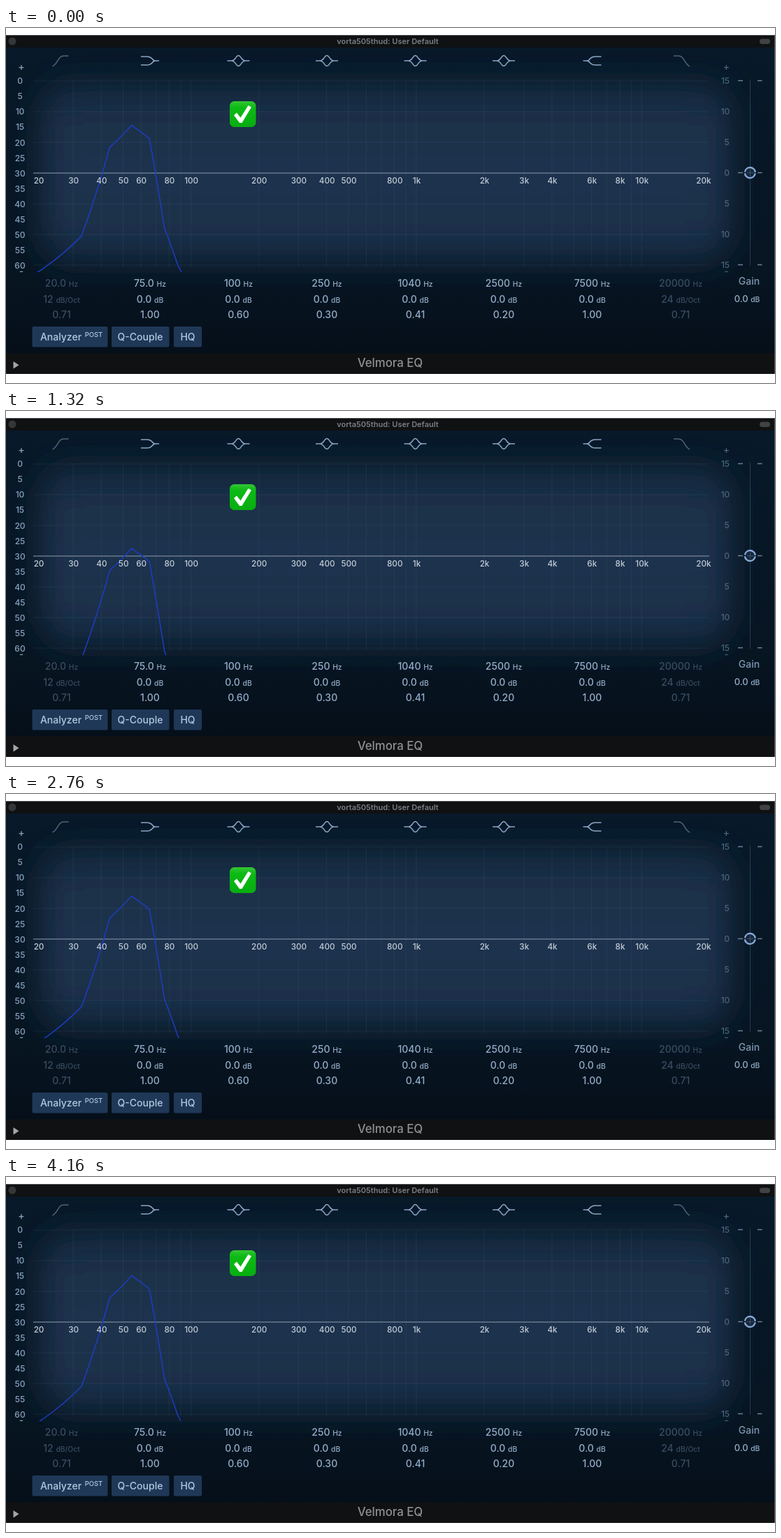
Animation of 1100x509 px, one loop 4200 ms. Source, as an HTML page:

```html
<!DOCTYPE html>
<html lang="en">
<head>
<meta charset="utf-8">
<title>Equalizer</title>
<style>
html, body { margin: 0; width: 100%; height: 100%; overflow: hidden; background: #fff; }
svg { display: block; width: 100%; height: 100%; }
text { font-family: Inter, Roboto, sans-serif; font-weight: 500; }
.mid { text-anchor: middle; }
.grid { stroke: #7295b8; stroke-opacity: .11; fill: none; }
.icon { fill: none; stroke: #8ba5c2; stroke-width: 1.5; stroke-linejoin: round; }
.icon.off { stroke: #526476; }
.curve { fill: none; stroke-width: 1.5; stroke-linejoin: round; }
.tick { stroke: #6b8098; stroke-width: 1.3; }
.button { fill: #1f3857; }
</style>
</head>
<body>
<svg viewBox="0 0 1100 509" preserveAspectRatio="none">
  <defs>
    <linearGradient id="body" x2="0" y2="1">
      <stop offset="0" stop-color="#081929"/>
      <stop offset=".75" stop-color="#071521"/>
      <stop offset="1" stop-color="#050f1a"/>
    </linearGradient>
    <linearGradient id="panel" x2="0" y2="1">
      <stop offset="0" stop-color="#182c42"/>
      <stop offset=".5" stop-color="#1d344f"/>
      <stop offset="1" stop-color="#182c44"/>
    </linearGradient>
    <linearGradient id="green" x2="0" y2="1">
      <stop offset="0" stop-color="#35c535"/>
      <stop offset=".25" stop-color="#0cba15"/>
      <stop offset="1" stop-color="#08ad10"/>
    </linearGradient>
    <filter id="soft" x="-10%" y="-40%" width="120%" height="180%"><feGaussianBlur stdDeviation="23"/></filter>
    <clipPath id="plot"><rect x="39.5" y="66" width="967" height="284"/></clipPath>
  </defs>

  <rect y="10" width="1100" height="486" fill="#101112"/>
  <circle cx="9" cy="19" r="5.5" fill="#343638"/>
  <rect x="1078" y="15.5" width="15" height="7.5" rx="3.7" fill="#404244"/>
  <text class="mid" x="546" y="22.5" font-size="11" style="font-weight:600" fill="#7b7f84">vorta505thud: User Default</text>

  <rect y="28" width="1100" height="438" fill="url(#body)"/>
  <rect x="50" y="80" width="986" height="256" rx="40" fill="url(#panel)" filter="url(#soft)"/>
  <path d="M0 10.5H1099.5V496" fill="none" stroke="#4b4d50"/>
  <g id="static"></g>

  <g clip-path="url(#plot)">
    <path id="blue" class="curve" stroke="#1d3cc0"/>
    <path id="red" class="curve" stroke="#a92d3f"/>
  </g>
  <g id="labels"></g>

  <rect x="320" y="105" width="37.5" height="37" rx="6.5" fill="url(#green)"/>
  <path d="M326 125L330 121.5L335.5 128.5L346.5 111L351 113.5L337.5 136H334Z" fill="#fff"/>

  <path d="M1064.5 74V341" stroke="#263a50"/>
  <circle cx="1064.3" cy="207.5" r="7.5" fill="#16263b" stroke="#86a8d6" stroke-width="2.4" stroke-dasharray="21.56 2" stroke-dashoffset="-1"/>
  <path d="M1060 207.5H1069M1064.5 203V212" stroke="#3c5270"/>

  <rect class="button" x="37.5" y="428" width="108" height="29.5" rx="2"/>
  <rect class="button" x="151" y="428" width="82.5" height="29.5" rx="2"/>
  <rect class="button" x="240" y="428" width="40" height="29.5" rx="2"/>
  <g class="mid" font-size="14" fill="#b2c8e2">
    <text x="78.5" y="448">Analyzer</text>
    <text x="125.5" y="443" font-size="9.5">POST</text>
    <text x="192" y="448">Q-Couple</text>
    <text x="260" y="448">HQ</text>
  </g>
  <path d="M0 466.5H1099" stroke="#0a1118"/>
  <path d="M10.5 478L18.5 483.2L10.5 488.5Z" fill="#a4a6a8"/>
  <text class="mid" x="549.5" y="486" font-size="16.8" fill="#8e9092">Velmora EQ</text>
</svg>
<script>
const $ = id => document.getElementById(id);
const LOOP = 4200, STEP = 40, BIN = 10.9;
const freqX = f => 39.3 + 322.3 * Math.log10(f / 20);
const label = (x, y, s, size, fill) =>
  `<text class="mid" x="${x}" y="${y}" font-size="${size}" fill="${fill}">${s}</text>`;

// Grid, zero line and slider ticks
let art = '', d = '';
for (let base = 10; base <= 10000; base *= 10)
  for (let n = 1; n < 10; n++) {
    const f = base * n;
    if (f > 20 && f < 20000) d += `M${freqX(f)} 76V343`;
  }
for (let y = 76; y < 345; y += 44) d += `M39 ${y}H1006`;
art += `<path class="grid" d="${d}"/><path d="M39 208H1006" stroke="#8b98a6" stroke-width="1.2"/>`;
for (let y = 75.5; y < 345; y += 132)
  art += `<path class="tick" d="M1047 ${y}H1054M1075 ${y}H1081.5"/>`;

// Bands: filter icons and settings
const bell = x => `M${x - 16} 47H${x - 10}Q${x - 7} 47 ${x - 4} 43Q${x} 36 ${x + 4} 43Q${x + 7} 47 ${x + 10} 47H${x + 16}` +
  `M${x - 10} 47Q${x - 7} 47 ${x - 4} 51Q${x} 58 ${x + 4} 51Q${x + 7} 47 ${x + 10} 47`;
const shelf = (x, s) => [41, 53].map(y =>
  `M${x - 13 * s} ${y}H${x - 4 * s}Q${x} ${y} ${x + 3 * s} ${(y + 47) / 2}Q${x + 5 * s} 47 ${x + 8 * s} 47`).join('') + `H${x + 13 * s}`;
const cut = (x, s) => `M${x - 11 * s} 55C${x - 6 * s} 53 ${x - 4 * s} 46 ${x} 42Q${x + 2 * s} 40 ${x + 5 * s} 40H${x + 12 * s}`;
const value = (x, y, n, unit, fill, size = 14) =>
  label(x, y, unit ? `${n} <tspan font-size="10.3">${unit}</tspan>` : n, size, fill);
const bands = [
  ['20.0', '0.71', '12'], ['75.0', '1.00'], ['100', '0.60'], ['250', '0.30'],
  ['1040', '0.41'], ['2500', '0.20'], ['7500', '1.00'], ['20000', '0.71', '24']
];
bands.forEach(([hz, q, slope], i) => {
  const x = 79.5 + i * 126.5, side = i < 4 ? 1 : -1;
  const fill = slope ? '#3a4c60' : '#94adc9';
  const path = slope ? cut(x - 2 * side, side) : i % 5 === 1 ? shelf(x, side) : bell(x);
  art += `<path class="icon ${slope ? 'off' : ''}" d="${path}"/>`;
  art += value(x, 371, hz, 'Hz', fill) + value(x, 416, q, '', fill) +
    value(x, 393.5, slope || '0.0', slope ? 'dB/Oct' : 'dB', fill);
});
art += value(1063, 368, 'Gain', '', '#7f96b1') + value(1060, 393, '0.0', 'dB', '#94adc9', 13);

// Scales
const scale = '#8aa3bf', dim = '#4d637b';
for (const [x, fill] of [[22, scale], [1030.5, dim]])
  art += label(x, 60.5, '+', 14, fill) + label(x, 353, '-', 13, fill);
for (let n = 0; n <= 60; n += 5) art += label(20, 80.3 + n * 4.41, n, 12, scale);
for (let n = -15; n <= 15; n += 5)
  art += label(Math.abs(n) > 9 ? 1029 : 1031, 212.3 + n * 8.8, Math.abs(n), 12, dim);
$('static').innerHTML = art;

let names = label(47, 223.3, 20, 11.7, '#c3ccd6') + label(998, 223.3, '20k', 11.7, '#c3ccd6');
for (let base = 10; base <= 10000; base *= 10)
  for (const n of [1, 2, 3, 4, 5, 6, 8]) {
    const f = base * n;
    const skip = f <= 20 || f >= 20000 || f === 600 || f === 5000;
    if (!skip) names += label(freqX(f) + .6, 223.3, f < 1000 ? f : f / 1000 + 'k', 11.7, '#c3ccd6');
  }
$('labels').innerHTML = names;

// Spectra: heights of the first bins, then a rule for the higher ones
const spectrum = (low, tail) => k => k <= low.length ? low[k - 1] : tail(freqX(k * BIN), k * BIN);
const tone = spectrum([396, 348, 300, 173, 141.5, 160.5, 289, 341], x => 341 + (x - 245) * 2);
const burst = spectrum([251, 245, 219, 188, 160, 177, 208, 236], x => 236 + 1.16 * (x - 245) ** .8);
const hit = spectrum([285, 259, 214, 162, 152.5, 171, 197, 207], (x, f) =>
  213 + (x - 245) * .383 - 7 * Math.cos((f - 140) / 210 * 2 * Math.PI) + 3 * Math.max(0, x - 602));

// Heights run straight between bins on a linear frequency axis
function curve(level) {
  const pts = [];
  for (let k = 1; k < 130; k++)
    for (let s = 0; s < 1; s += .25) {
      const y = level(k) + (level(k + 1) - level(k)) * s;
      pts.push(freqX((k + s) * BIN).toFixed(1) + ' ' + Math.min(y, 900).toFixed(1));
    }
  return 'M' + pts.join('L');
}
const clamp = v => Math.max(0, Math.min(1, v));

function blueLevel(k, t) {
  const held = tone(k) - 1.9;
  const spread = 1 + .08 * Math.min(1, Math.abs(k - 5) / 2);
  const fall = burst(k) + (Math.max(t, 480) - 560) * .242 * spread;
  if (t < 480) return held + (fall - held) * clamp((t - 400) / 80);
  if (t <= 1256) return fall;
  // Averaged power of a steady tone climbing to its full level
  const power = 1 - Math.exp((1256 - t) / 1260);
  return Math.min(fall, tone(k) - 44.1 * Math.log10(power) - 2);
}

// Quick rise from below, then a steady fall
const redShift = t => t < 520 ? 240 * (1 - clamp((t - 360) / 160)) ** 2 - 6
  : (t - 560) * (t < 560 ? .15 : .6);

function draw(now) {
  const t = Math.floor(now % LOOP / STEP) * STEP;
  $('blue').setAttribute('d', curve(k => blueLevel(k, t)));
  const live = t >= 400 && t < 900;
  $('red').setAttribute('d', live ? curve(k => hit(k) + redShift(t)) : '');
}

const start = performance.now();
function tick() {
  draw(performance.now() - start);
  requestAnimationFrame(tick);
}
tick();
</script>
</body>
</html>
```
